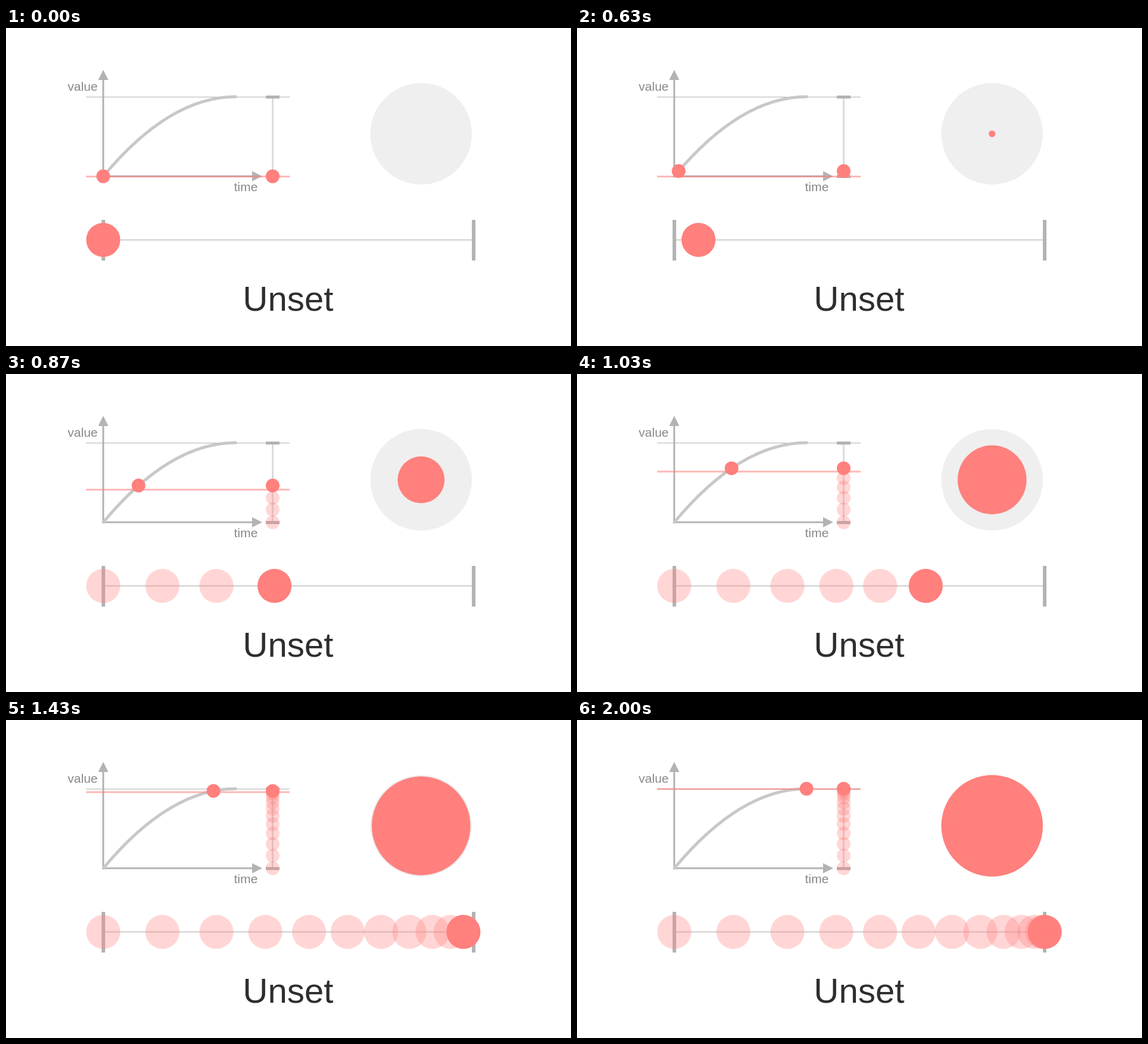
These frames come from a looping animation (946 px wide and 532 px high, 2.91 s). An HTML page with a canvas:

```html
<!DOCTYPE html>
<html lang="en">
<head>
<meta charset="utf-8">
<title>Unset</title>
<style>
html, body { margin: 0; width: 100%; height: 100%; overflow: hidden; background: #fff; }
canvas { display: block; }
</style>
</head>
<body>
<canvas id="stage" width="946" height="532"></canvas>
<script>
const ctx = document.getElementById('stage').getContext('2d');
const LOOP = 2910, START = 600, STEPS = 30, GHOSTS = 12;
const RED = '#ff807d', GREY = '#b3b3b3', PALE = '#dcdcdc';
const PINK = 'rgba(255,128,125,.32)';

const ease = p => p * (2 - p);
const trackX = v => 162.8 + 620.3 * v;
const graphY = v => 248 - 133 * v;

function line(x1, y1, x2, y2, width, color) {
  ctx.lineWidth = width;
  ctx.strokeStyle = color;
  ctx.beginPath();
  ctx.moveTo(x1, y1);
  ctx.lineTo(x2, y2);
  ctx.stroke();
}

function disc(x, y, r, color) {
  ctx.fillStyle = color;
  ctx.beginPath();
  ctx.arc(x, y, r, 0, 2 * Math.PI);
  ctx.fill();
}

function triangle(...points) {
  ctx.fillStyle = GREY;
  ctx.beginPath();
  for (const [x, y] of points) ctx.lineTo(x, y);
  ctx.fill();
}

function text(str, x, y, size, color) {
  ctx.font = `${size}px "Liberation Sans", Arial, sans-serif`;
  ctx.fillStyle = color;
  ctx.fillText(str, x, y);
}

function drawGraph() {
  line(134, 115.5, 475, 115.5, 1, GREY);
  line(446.5, 115, 446.5, 248, 3, PALE);
  line(435, 115.5, 458, 115.5, 5, GREY);
  line(435, 248.5, 458, 248.5, 5, GREY);
  line(162.8, 249.5, 162.8, 85, 3, GREY);
  line(162, 248, 414, 248, 3, GREY);
  triangle([162.8, 70], [171.3, 87], [154.3, 87]);
  triangle([429, 248], [412, 239.5], [412, 256.5]);

  ctx.lineWidth = 5;
  ctx.lineCap = 'round';
  ctx.strokeStyle = '#c8c8c8';
  ctx.beginPath();
  ctx.moveTo(163, 248);
  ctx.quadraticCurveTo(273.75, 115, 384.5, 115);
  ctx.stroke();
  ctx.lineCap = 'butt';

  text('value', 103.3, 105, 21, '#888');
  text('time', 381.7, 273, 21, '#888');
}

function drawTrack() {
  line(163, 354.5, 783, 354.5, 3, PALE);
  line(163, 321, 163, 389, 6, GREY);
  line(783, 321, 783, 389, 6, GREY);
}

function draw(step) {
  const p = step / STEPS, v = ease(p);
  ctx.fillStyle = '#fff';
  ctx.fillRect(0, 0, 946, 532);
  drawGraph();
  drawTrack();
  disc(695, 177, 85, '#efefef');
  text('Unset', 396.5, 473, 58, '#2e2e30');

  // the level line trails the dots by one step
  const level = graphY(ease(Math.max(0, step - 1) / STEPS)) + 0.4;
  line(134, level, 475, level, 3, 'rgba(255,128,125,.55)');

  for (let i = 0; i < Math.round(p * GHOSTS); i++) {
    const g = ease(i / GHOSTS);
    disc(446.5, graphY(g), 11.5, PINK);
    disc(trackX(g), 354.5, 28.5, PINK);
  }

  disc(162.8 + 221.5 * p, graphY(v), 11.5, RED);
  disc(446.5, graphY(v), 11.5, RED);
  disc(trackX(v), 354.5, 28.5, RED);
  disc(695, 177, 85 * v, RED);
}

let begin;
function frame(now) {
  begin ??= now;
  // the clock ticks in 10 ms units, the motion runs at 30 steps per second
  const t = Math.floor((now - begin) % LOOP / 10) * 10;
  const step = Math.floor((t - START + 5) * STEPS / 1000);
  draw(Math.min(STEPS, Math.max(0, step)));
  requestAnimationFrame(frame);
}
requestAnimationFrame(frame);
</script>
</body>
</html>
```
